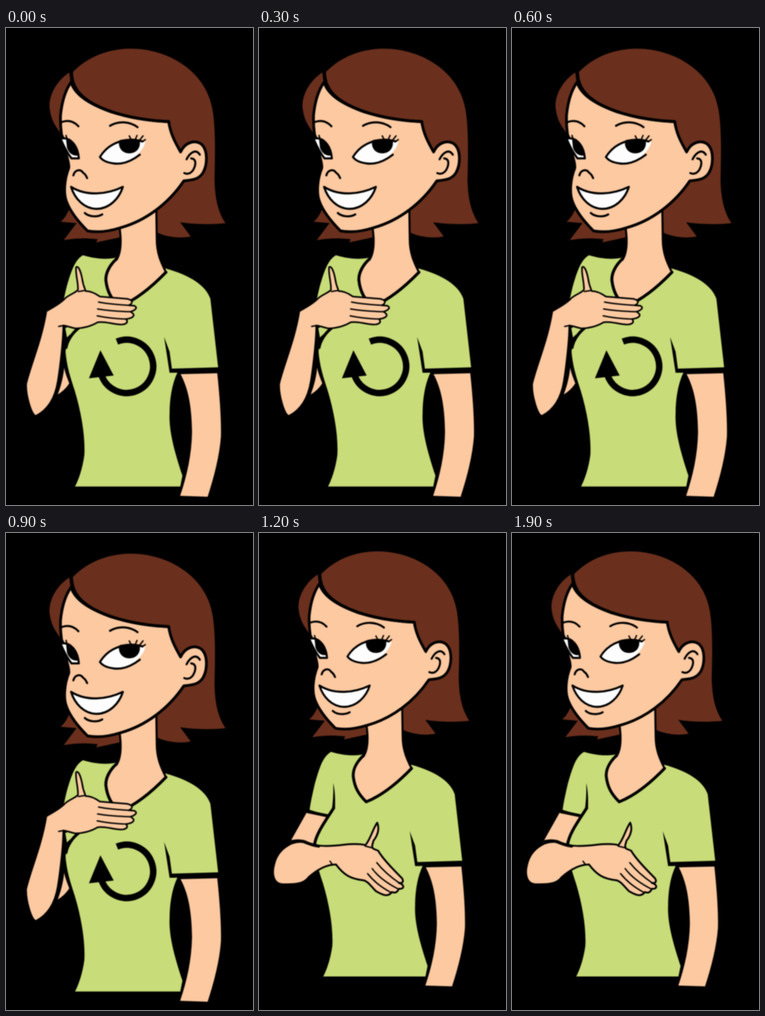
Write an HTML page that moves like this. It is 539 by 1039 pixels and loops after 2000 ms.

```html
<!DOCTYPE html>
<html lang="en">
<head>
<meta charset="utf-8">
<title>Signing woman</title>
<style>
  html, body { margin: 0; height: 100%; overflow: hidden; background: #000; }
  svg { display: block; width: 100vw; height: 100vh; filter: blur(.8px); }
  .line { fill: none; stroke: #000; stroke-width: 4.5; stroke-linecap: round; stroke-linejoin: round; }
  .bold { stroke-width: 6.5; }
  .thin { stroke-width: 3; }
  .hair { fill: #6a301d; }
  .skin { fill: #fcc9a1; }
  .shirt { fill: #c8dc79; }
  .white { fill: #fdfdfd; }
</style>
</head>
<body>
<svg viewBox="0 0 539 1039" preserveAspectRatio="none">
  <g id="body">
    <!-- hair behind the face -->
    <path class="hair" d="M145 97C175 65 220 45 272 45C355 45 438 95 451 180C458 225 456 280 455 330C456 370 462 400 479 425C445 429 405 427 380 423L403 454C380 459 350 455 331 446L300 430L248 456L197 467L200 460C170 457 150 458 126 462L154 425L119 422C128 415 135 403 139 391L180 400Z"/>
    <path class="hair" d="M138 97C110 115 90 150 96 180C100 205 110 215 118 228L120 190C122 160 130 135 141 120Z"/>

    <!-- shirt and neck -->
    <path class="shirt" d="M168 495C150 505 142 530 132 565C125 595 122 610 120 625L160 637C145 655 131 680 130 706C133 740 142 765 150 790C165 840 173 890 171 930C167 960 158 985 150 1000L380 1000L385 975C370 930 355 880 357 840C357 800 365 768 375 749L463 740L446 590C436 560 400 538 349 524L241 500C220 505 195 503 168 495Z"/>
    <path class="skin" d="M248 420C252 465 251 490 241 505C225 520 217 535 218 550C221 575 230 590 247 607C285 592 320 562 349 532C338 510 329 490 329 460L328 380Z"/>
    <path class="line" d="M248 436C252 465 251 490 241 505M328 395L329 460C329 490 338 510 349 532"/>
    <path class="line bold" d="M241 503C225 518 217 535 218 550C221 575 230 590 247 607C285 592 320 562 349 532"/>
    <path d="M345 673L357 705L362 742L465 739V750L357 751Z"/>
    <path class="line" d="M150 1001H381"/>

    <path class="skin" d="M381 754L461 752C466 800 470 850 469 890C466 930 455 975 440 1021L380 1019C395 975 405 930 406 880C405 830 400 790 381 754Z"/>

    <!-- face and ear -->
    <path class="skin" stroke="#000" stroke-width="6" stroke-linejoin="round" d="M142 118C150 145 180 165 230 183C270 195 310 202 355 204C359 230 368 247 381 270C390 250 410 243 425 252C441 264 440 297 430 315C420 331 405 331 388 333C355 382 305 420 250 435C225 443 200 446 178 442C160 424 140 400 132 378C125 360 127 330 137 305C138 295 134 285 130 270C122 250 118 215 119 190C122 160 130 135 142 118Z"/>
    <path class="line bold" d="M143 98C144 128 160 148 190 165C235 189 295 201 355 204"/>
    <path class="line" d="M394 286C402 270 415 263 423 276M404 284C417 285 414 300 408 310C402 318 396 319 389 316"/>

    <!-- brows, nose, mouth -->
    <path class="line" d="M121 205C135 200 148 203 158 214M227 213C245 202 270 203 287 216M147 321C150 309 162 306 168 315Q174 319 177 327M172 403C182 412 200 412 210 406"/>
    <path class="line white" style="fill:#fdfdfd" d="M142 346C175 367 220 363 255 346C247 372 225 394 197 394C170 393 150 372 142 346Z"/>

    <!-- eyes -->
    <path class="white" d="M205 281C225 245 270 235 304 249C297 275 265 297 235 295C220 293 210 288 205 281Z"/>
    <path d="M247 245C262 240 280 241 292 246C294 262 284 273 269 273C253 273 244 260 247 245Z"/>
    <path class="line" d="M292 276C270 293 250 297 235 295C220 293 210 288 205 281C225 248 265 237 298 247"/>
    <path class="line thin" d="M273 243L269 235M282 243L286 234M291 245L299 235M297 248L304 243M127 241L122 231M133 241L131 234"/>
    <path class="white" d="M119 241C140 237 157 256 159 284L143 284C132 270 125 255 119 241Z"/>
    <path d="M131 241C148 243 157 260 159 277C147 281 136 272 133 260Z"/>
    <path class="line" d="M119 241C142 236 157 258 159 284L143 284C132 270 125 255 119 241"/>
  </g>

  <g id="inward">
    <path class="shirt" d="M128 646L158 650L133 674Z"/>
    <path class="line bold" d="M158 654C145 664 134 680 131 696"/>
    <path class="skin" d="M127 740C129 752 134 763 138 774C131 785 122 793 113 798C120 780 125 760 127 740Z"/>
    <path fill="none" stroke="#000" stroke-width="14" d="M242 683A58 58 0 1 1 208 755"/>
    <path d="M206 702L181 763L235 757Z"/>
    <path class="skin" stroke="#000" stroke-width="3.5" stroke-linejoin="round" d="M88 617C100 610 120 600 130 588C140 580 155 575 157 570C158 555 151 535 153 521C158 517 163 530 166 545C168 560 172 568 174 573C185 573 195 578 205 585L265 590C278 593 277 600 268 604L280 605C288 609 283 614 272 618L277 622C282 627 276 632 262 634C268 641 262 646 250 646C230 645 215 638 200 641C185 650 165 655 150 654C140 652 130 648 125 648C125 680 118 740 113 770C108 800 95 830 65 845C55 842 43 800 44 775C55 730 78 680 88 617Z"/>
    <path class="line thin" d="M202 597Q228 602 268 604M200 612Q230 617 272 618M199 627Q228 633 262 634M115 650L126 648L131 652M158 574L171 572"/>
  </g>

  <g id="outward">
    <path class="skin" d="M104 609L148 619C138 640 125 660 121 676L68 673Z"/>
    <path class="line bold" d="M106 607L150 616M163 599C146 626 124 655 121 680"/>
    <path d="M162 545Q167 565 166 600L158 608Q163 580 162 545Z"/>
    <path class="skin" stroke="#000" stroke-width="4" stroke-linejoin="round" d="M33 722C40 690 70 670 95 673C125 685 160 682 185 679C205 677 222 677 232 680C243 668 248 645 258 631C264 645 258 660 250 670C247 680 245 684 250 688L260 692C270 710 295 735 312 752C317 760 312 764 305 762C318 766 318 776 305 775C302 783 296 785 290 782C282 793 272 790 255 780C243 768 237 757 225 756C200 753 185 745 168 722C145 722 125 735 108 750C98 765 75 766 50 765C30 763 28 740 33 722Z"/>
    <path class="line bold" d="M72 672Q85 669 98 672Q115 680 130 682"/>
    <path class="line thin" d="M257 718Q275 741 307 763M247 731Q264 755 303 775M237 742Q256 766 288 783M232 682L248 686M155 715L160 722"/>
  </g>
</svg>
<script>
  const [body, inward, outward] = ["body", "inward", "outward"].map(id => document.getElementById(id));

  function draw() {
    const out = performance.now() % 2000 >= 1000;
    body.setAttribute("transform", out ? "translate(-6 -3.8) scale(.971)" : "");
    inward.style.display = out ? "none" : "";
    outward.style.display = out ? "" : "none";
    requestAnimationFrame(draw);
  }
  draw();
</script>
</body>
</html>
```
